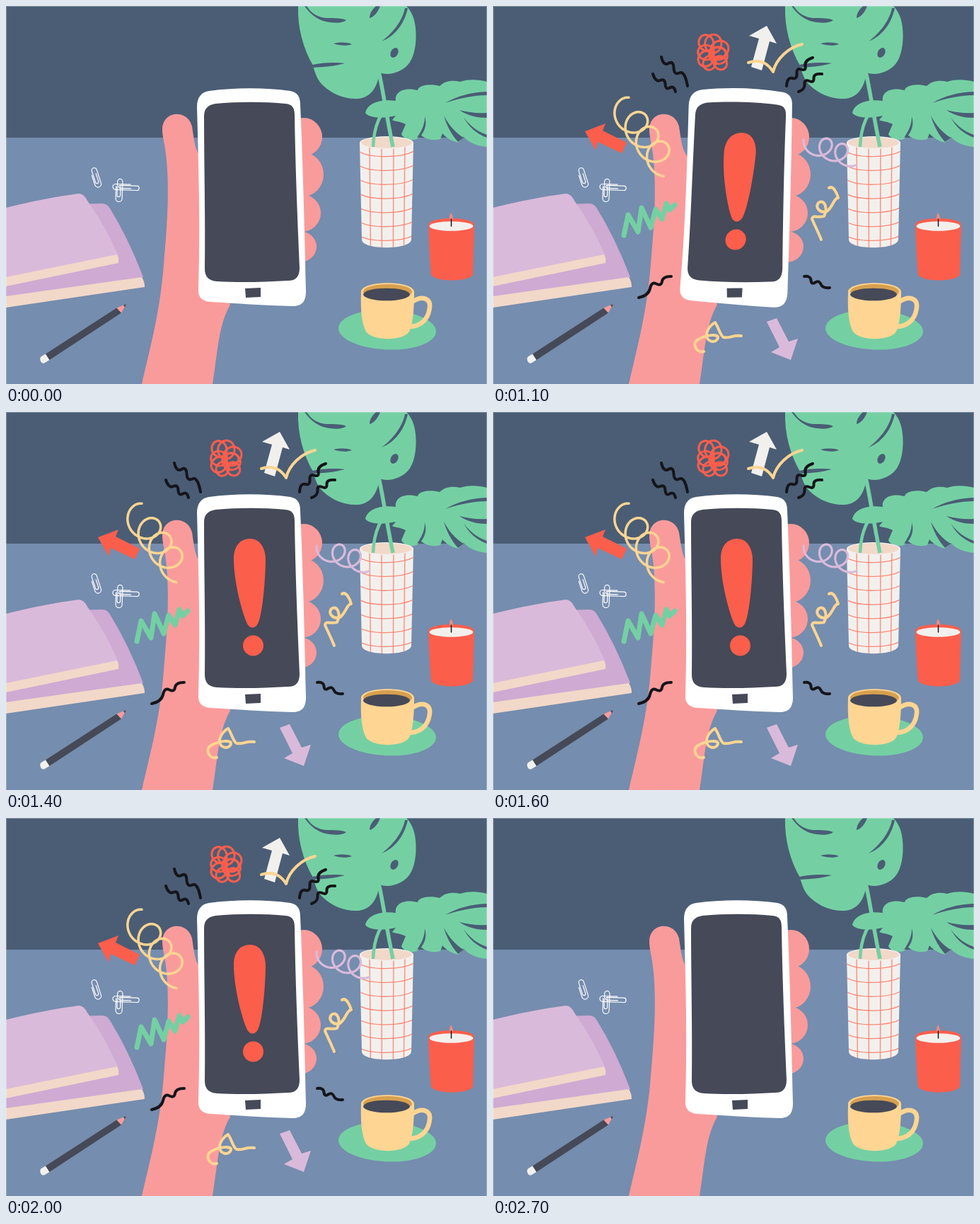
Write an HTML page with a canvas that moves like this. It is 680 by 534 pixels and loops after 3.2 s.

```html
<!DOCTYPE html>
<html lang="en">
<head>
<meta charset="utf-8">
<title>Phone alert</title>
<style>
html, body { margin: 0; width: 100%; height: 100%; overflow: hidden; background: #758dae; }
canvas { display: block; width: 680px; height: 534px; }
</style>
</head>
<body>
<canvas id="stage" width="680" height="534"></canvas>
<script>
const ctx = document.getElementById('stage').getContext('2d');
const WALL = '#4a5d75', TABLE = '#758dae', SKIN = '#fa9b9b', DARK = '#464957';
const GREEN = '#74d0a3', RED = '#fc5e4c', YELLOW = '#fed592', CREAM = '#f2f0ed';
const LILAC = '#dabada', VIOLET = '#cfaad3', PAPER = '#f2d8c8', INK = '#15151a';
const GRID = '#ff8572';
const LOOP = 3200;

ctx.lineCap = ctx.lineJoin = 'round';

function fill(d, color) {
  ctx.fillStyle = color;
  ctx.fill(new Path2D(d));
}

function stroke(d, color, width) {
  ctx.strokeStyle = color;
  ctx.lineWidth = width;
  ctx.stroke(new Path2D(d));
}

function ellipse(x, y, rx, ry, color, angle = 0) {
  ctx.fillStyle = color;
  ctx.beginPath();
  ctx.ellipse(x, y, rx, ry, angle, 0, Math.PI * 2);
  ctx.fill();
}

// Smooth stroke through the midpoints of a zigzag.
function wiggle(points, color, width) {
  const last = points.length - 1;
  let d = `M${points[0]}`;
  for (let i = 1; i < last; i++) {
    const [x, y] = points[i], [nx, ny] = points[i + 1];
    d += i === last - 1 ? `Q${x} ${y} ${nx} ${ny}` : `Q${x} ${y} ${(x + nx) / 2} ${(y + ny) / 2}`;
  }
  stroke(d, color, width);
}

// Circle of radius r whose centre drifts; angles in degrees.
function coil([x0, y0], [x1, y1], r, a0, a1, color, width) {
  let d = '';
  for (let i = 0; i <= 120; i++) {
    const t = i / 120, a = (a0 + (a1 - a0) * t) * Math.PI / 180;
    const x = x0 + (x1 - x0) * t + r * Math.cos(a);
    const y = y0 + (y1 - y0) * t + r * Math.sin(a);
    d += `${i ? 'L' : 'M'}${x.toFixed(2)} ${y.toFixed(2)}`;
  }
  stroke(d, color, width);
}

// Draws with x' = x + shearX * dy and y' = y + shearY * dx around a pivot.
function leaned(x, y, shearX, shearY, draw) {
  ctx.save();
  ctx.translate(x, y);
  ctx.transform(1, shearY, shearX, 1, 0, 0);
  ctx.translate(-x, -y);
  draw();
  ctx.restore();
}

function clip(x, y, degrees, length, width) {
  const h = length / 2, w = width / 2;
  ctx.save();
  ctx.translate(x, y);
  ctx.rotate(degrees * Math.PI / 180);
  stroke(`M${-w} ${-h * .3}V${h - w}A${w} ${w} 0 0 0 ${w} ${h - w}V${w - h}` +
    `A${w * .8} ${w * .8} 0 0 0 ${-w * .6} ${w - h}V${h * .45}` +
    `A${w * .5} ${w * .5} 0 0 0 ${w * .4} ${h * .45}V${-h * .35}`, '#fff', 1.2);
  ctx.restore();
}

function drawPlant() {
  fill('M413 0C412 30 420 60 434 84C437 96 441 106 449 113C462 125 480 132 497 131C514 130 525 117 528 94C541 99 559 94 569 82C580 69 582 40 577 20C575 12 571 5 566 0Z', GREEN);
  fill('M425 0C432 11 441 16 453 17C465 17 475 17 481 20C475 25 463 24 452 22C439 19 430 11 422 0Z', WALL);
  fill('M463 53C473 51 482 51 489 54C482 57 471 56 463 53Z', WALL);
  fill('M433 83C447 80 465 79 479 81C465 85 450 86 435 87Z', WALL);
  fill('M523 0C517 6 514 11 514 17C520 16 526 8 529 0Z', WALL);
  fill('M564 3C561 20 547 38 531 50C549 43 563 26 568 3Z', WALL);
  ellipse(549, 66, 5, 7.5, WALL, .5);

  fill('M508 151C511 138 527 131 551 134C549 121 563 114 582 119C583 112 599 109 613 113C620 106 631 104 642 107C655 103 668 104 680 107V199C666 198 655 193 647 185L639 193C630 191 622 186 617 180L614 188C603 191 593 188 586 182L581 188C572 191 561 187 559 181L565 167C558 163 549 163 546 161L551 155C534 159 514 159 508 151Z', GREEN);
  fill('M680 121C657 122 638 127 621 137C642 130 661 126 680 126Z', WALL);
  fill('M680 151C666 152 653 150 641 147C652 155 667 158 680 158Z', WALL);
  fill('M619 155C626 168 635 179 647 186L639 192C630 182 623 169 619 155Z', WALL);
  fill('M647 157C656 170 668 178 680 182V186C666 181 654 171 647 157Z', WALL);
  fill('M592 156C592 169 587 177 581 186L586 184C593 175 595 166 592 156Z', WALL);
}

function drawVase() {
  const body = 'M500 193L503 330C503 345 572 345 573 330L576 193Z';
  fill(body, CREAM);
  ctx.save();
  ctx.clip(new Path2D(body));
  for (let i = 0; i < 7; i++) {
    const y = 206 + i * 19.8;
    stroke(`M500 ${y}C515 ${y + 9} 559 ${y + 9} 577 ${y - 1}`, GRID, 1.3);
  }
  for (const x of [514, 531, 548, 564]) stroke(`M${x} 193L${538 + (x - 538) * .94} 342`, GRID, 1.3);
  ctx.restore();
  ellipse(538, 193, 38, 9, CREAM);
  ellipse(538, 193, 36, 7.7, PAPER);
  ctx.lineCap = 'butt';
  stroke('M527 93C533 118 537 151 547 199', GREEN, 5.5);
  stroke('M550 137C529 145 520 171 519 199', GREEN, 4.5);
  ctx.lineCap = 'round';
}

function drawCandle() {
  fill('M597 309C598 335 599 360 601 380C608 390 653 390 660 380L662 309C660 297 599 297 597 309Z', RED);
  ellipse(629.5, 311, 31, 6.8, CREAM);
  fill('M629 292C633 298 632 303 629.5 303C627 303 626 298 629 292Z', '#f58a80');
  stroke('M629.5 301V311', INK, 1.5);
}

function drawCup() {
  ellipse(539, 457.5, 69, 28, GREEN, .04);
  stroke('M574 418C589 408 602 413 598.5 429C596 444 585 452 572 453', YELLOW, 6.5);
  fill('M502 404C501 431 503 449 509 460C517 473 561 474 570 460C576 448 577 424 577 404C577 387 502 387 502 404Z', YELLOW);
  ellipse(539.5, 403.5, 34.5, 10.5, '#d7a04f');
  ellipse(538, 407.5, 33, 8.8, DARK);
}

function drawBooks() {
  fill('M100 280L136 279Q143 279 147 286Q173 328 194 383L0 411V310Z', VIOLET);
  fill('M0 410L192 383Q196 389 196 397L0 426Z', PAPER);
  fill('M0 285C35 276 72 269 103 265Q110 265 115 275Q140 310 158 351L0 384Z', LILAC);
  fill('M0 383L157 351Q160 356 159 363L0 396Z', PAPER);
}

function drawPencil() {
  fill('M56 491.5L61.5 500L55 504Q51 506 49 502Q47 497 50 495Z', CREAM);
  fill('M56 491.5L156.5 426.5L163 433.5L61.5 500Z', DARK);
  fill('M156.5 426.5L170 421L163 433.5Z', SKIN);
  fill('M166 422.5L170 421L168 425.5Z', DARK);
}

function drawHand() {
  fill('M192 534C205 478 218 430 223 365C228 309 231 263 227 218C225 195 221 186 221 174C222 147 257 146 263 170C266 190 267 205 277 215L300 380L317 422C300 451 299 492 292 534Z', SKIN);
  ellipse(421, 185, 26, 27, SKIN);
  ellipse(420, 238, 29, 31, SKIN);
  ellipse(418, 292.5, 27, 26.5, SKIN);
  ellipse(415, 340, 24, 22, SKIN);
}

function drawDesk() {
  ctx.fillStyle = WALL;
  ctx.fillRect(0, 0, 680, 186);
  ctx.fillStyle = TABLE;
  ctx.fillRect(0, 186, 680, 348);
  drawPlant();
  drawVase();
  drawCandle();
  drawCup();
  drawBooks();
  drawPencil();
  clip(127, 242, -18, 29, 9);
  clip(160, 260, 2, 33, 9);
  clip(170, 256, 92, 38, 8);
  drawHand();
}

function drawScribble() {
  ctx.strokeStyle = RED;
  ctx.lineWidth = 3;
  for (let i = 0; i < 9; i++) {
    const a = i * 2.4, reach = 9 + 3.2 * (i % 4), r = 10 + i % 3 * 1.5;
    ctx.beginPath();
    ctx.ellipse(310 + reach * Math.cos(a), 67 + reach * Math.sin(a) * .9, r, r * .9, a, 0, Math.PI * 2);
    ctx.stroke();
  }
}

function drawAlert() {
  drawScribble();
  fill('M387 28L401 53L391 50L380 91L365 86L376 46L362 42Z', CREAM);
  fill('M130 177L159 166L155 176L189 193L182 208L148 192L145 204Z', RED);
  fill('M387 446L401 441L418 474L431 470L421 500L393 489L405 482Z', LILAC);

  stroke('M361 80C376 75 388 80 396 93C400 75 418 58 437 54', YELLOW, 4);
  coil([187, 148], [241, 221], 19.5, -75, -1350, YELLOW, 3.5);
  coil([452, 195], [506, 213], 14, 205, -665, LILAC, 3.2);
  stroke('M475 257C481 253 486 264 488 271C482 271 480 285 472 290C462 293 455 285 460 278C468 272 474 285 468 297C460 300 452 294 451 301C455 310 460 320 464 330', YELLOW, 4);
  stroke('M298 488C288 491 280 477 290 471C300 465 319 462 318 469C315 477 302 475 302 465C302 456 310 449 314 447C320 456 321 466 326 468C335 470 340 464 351 466', YELLOW, 4);
  stroke('M185 324L191 295L205 319L210 285L223 313L230 287L239 301L245 279L250 288L257 281', GREEN, 7);

  const shakes = [
    [[238, 72], [241, 85], [255, 77], [256, 98], [271, 91], [275, 113]],
    [[226, 96], [230, 108], [243, 102], [244, 119], [256, 112], [258, 121]],
    [[452, 73], [440, 77], [443, 92], [429, 87], [430, 104], [416, 100], [415, 113]],
    [[465, 96], [453, 95], [454, 109], [440, 103], [441, 118], [432, 121]],
    [[252, 382], [240, 382], [238, 396], [224, 389], [220, 409], [206, 412]],
    [[440, 382], [449, 381], [450, 394], [461, 387], [466, 399], [476, 398]]
  ];
  for (const points of shakes) wiggle(points, INK, 4);
}

function drawCase() {
  fill('M270 143C270 130 275 122 287 120C325 115 365 115 402 120C412 122 416 128 416 139C419 205 422 305 424 403C424 418 418 424 405 424C365 423 325 420 289 418C277 417 271 411 272 399C275 310 272 220 270 143Z', '#fff');
  fill('M280 156C280 145 285 140 296 138C328 135 365 135 395 138C405 139 408 144 408 154C409 225 412 300 415 370C415 382 410 388 399 388C365 390 330 391 298 389C287 388 281 383 281 371C282 300 280 225 280 156Z', DARK);
  fill('M338 399L360 398V411L339 412Z', DARK);
}

function drawMark() {
  fill('M344 179C359 178 368 193 367 212C366 249 362 284 357 297C353 307 344 307 340 297C331 275 322 235 322 208C322 190 330 180 344 179Z', RED);
  ellipse(349.5, 330, 14.5, 14.5, RED);
}

function drawPhone(tilted, alert) {
  leaned(347, 264, tilted ? -.055 : 0, tilted ? .03 : 0, drawCase);
  if (alert) leaned(347, 259, tilted ? -.09 : 0, tilted ? .03 : 0, drawMark);
}

function render(now) {
  const t = now % LOOP;
  const alert = t >= 1000 && t < 2700;
  const tilted = t >= 1000 && t < 2200 && Math.floor(t / 100) % 2 === 1;
  drawDesk();
  if (alert) drawAlert();
  drawPhone(tilted, alert);
  stroke('M0.5 534V0.5H679.5V534', 'rgba(255,255,255,.3)', 1);
}

const start = performance.now();
function tick() {
  render(performance.now() - start);
  requestAnimationFrame(tick);
}
tick();
</script>
</body>
</html>
```
